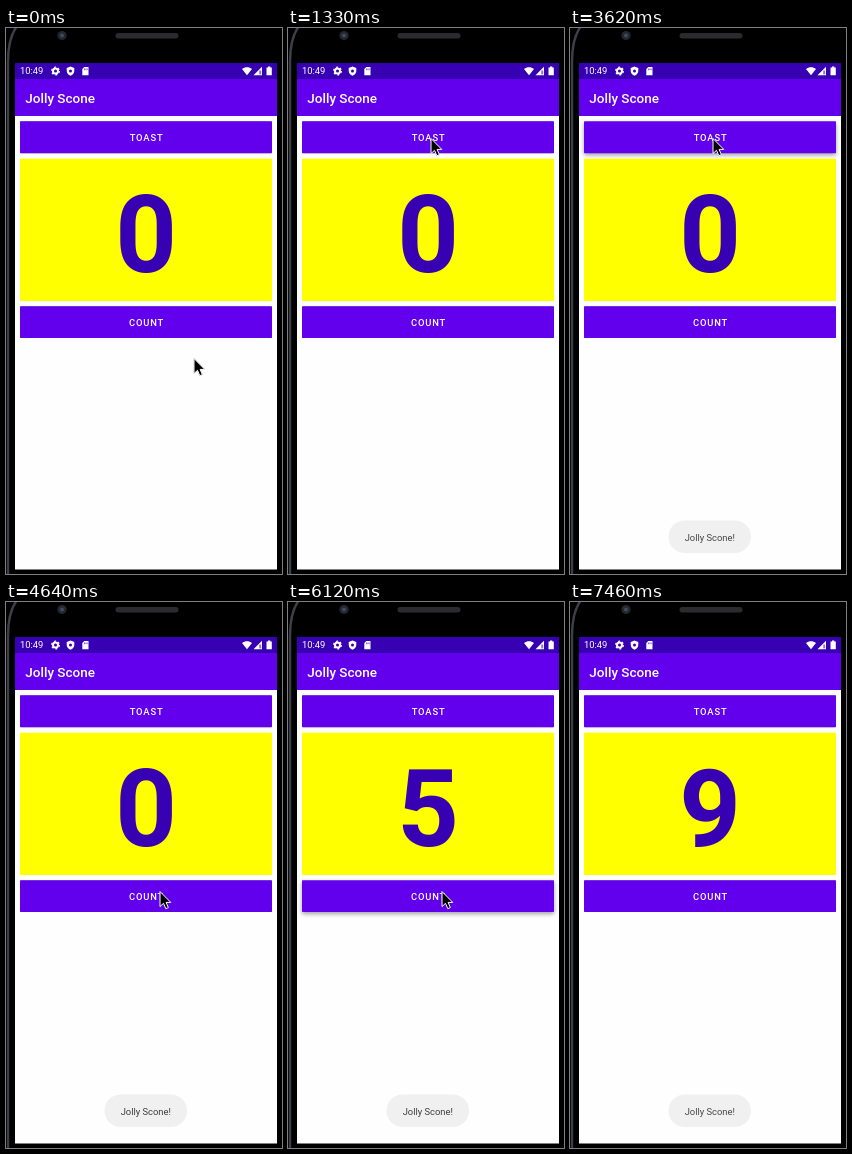
An HTML page for the animation above (7560 ms loop, 276 px wide and 546 px high).

```html
<!DOCTYPE html>
<html lang="en">
<head>
<meta charset="utf-8">
<title>Counter demo</title>
<style>
  html, body { margin: 0; width: 100%; height: 100%; overflow: hidden; background: #000; }
  svg { display: block; width: 100vw; height: 100vh; }
  text { font-family: Roboto, "Open Sans", sans-serif; fill: #fff; }
  .label { font-size: 9.4px; font-weight: 500; letter-spacing: .84px; text-anchor: middle; }
  .button { filter: drop-shadow(0 .7px .7px rgba(0, 0, 0, .35)); }
  .button.pressed { filter: drop-shadow(0 2px 2px rgba(0, 0, 0, .36)); }
</style>
</head>
<body>
<svg viewBox="0 0 276 546" xmlns="http://www.w3.org/2000/svg">
  <!-- phone -->
  <rect width="276" height="546" fill="#000"/>
  <path d="M11 -2C5 6 2 16 2 34V548" fill="none" stroke="#3d4049" stroke-width="2.4"/>
  <circle cx="56" cy="7.5" r="4.6" fill="#24272d"/>
  <circle cx="56" cy="7.5" r="2" fill="#3e4a60"/>
  <rect x="109.500" y="5" width="63" height="5.500" rx="2.750" fill="#2b2b2d"/>

  <!-- screen -->
  <rect x="9" y="35" width="262" height="506.500" fill="#fefefe"/>
  <rect x="9" y="51" width="262" height="37" fill="#6200ee"/>
  <rect x="9" y="35" width="262" height="16" fill="#3700b3"/>
  <text x="14" y="46.400" font-size="9.4">10:49</text>
  <g fill="#fff">
    <circle cx="49.500" cy="43" r="2.500" fill="none" stroke="#fff" stroke-width="2"/>
    <circle cx="49.500" cy="43" r="3.800" fill="none" stroke="#fff" stroke-width="1.300" stroke-dasharray="2 1.979"/>
    <path d="M64.500 38.500L68.300 40V43C68.300 45.300 66.500 47 64.500 47.700C62.500 47 60.700 45.300 60.700 43V40Z"/>
    <circle cx="64.500" cy="43" r="1.500" fill="#3700b3"/>
    <path d="M78.300 39H82.500V47.200H76.300V41Z"/>
    <path d="M78.500 40.500V42.200M79.900 40.500V42.200M81.200 40.500V42.200" stroke="#3700b3" stroke-width=".6"/>
    <path d="M236 41C239 38.500 243 38.500 246 41L241 47.200Z"/>
    <path d="M247.500 47.200L256 38.700V47.200Z"/>
    <path d="M253.200 42.500H255.200V46.400H253.200Z" fill="#3700b3" opacity=".55"/>
    <path d="M260.500 39.600H262V38.600H264.300V39.600H265.800V47.300H260.500Z"/>
  </g>
  <text x="19.300" y="74.700" font-size="13.5" font-weight="500">Jolly Scone</text>

  <rect class="button" id="top" x="14" y="93.300" width="252" height="32" rx=".8" fill="#6200ee"/>
  <text class="label" x="140.600" y="113">TOAST</text>
  <rect x="14" y="130.700" width="252" height="142.300" fill="#ff0"/>
  <text id="count" x="140" y="244.300" font-size="107.5" font-weight="700" text-anchor="middle" style="fill:#3700b3">0</text>
  <rect class="button" id="low" x="14" y="278.300" width="252" height="31.700" rx=".8" fill="#6200ee"/>
  <text class="label" x="140.600" y="298">COUNT</text>

  <g id="toast">
    <rect x="98.500" y="492.500" width="82.500" height="32.500" rx="16" fill="#f0f0f0"/>
    <text x="139.800" y="513" font-size="9.4" text-anchor="middle" style="fill:#3c3c3c">Jolly Scone!</text>
  </g>

  <g id="cursor">
    <path d="M0 .5V15.600L3.500 12.300L5.800 17.700L8.400 16.600L6.100 11.400H10.800Z"
      fill="#000" stroke="#fff" stroke-width="1" stroke-linejoin="round"
      style="filter:drop-shadow(0 .8px .7px rgba(0,0,0,.35))"/>
  </g>
</svg>
<script>
const LOOP = 7560;
const $ = id => document.getElementById(id);

// Each move: start, end, number of steps, target x and y.
const moves = [
  [150, 440, 3, 164, 227],
  [740, 1330, 5, 143, 110],
  [3760, 4200, 4, 147, 241],
  [4350, 4640, 3, 154, 289],
  [6860, 7160, 3, 166, 570]
];
const counts = [[0, 0], [5380, 1], [5670, 2], [5820, 3], [6120, 5], [6270, 6], [6410, 8], [6560, 9]];

// Share of a stepped change that is done at time t.
function stepped(t, from, to, n) {
  if (t < from) return 0;
  if (t >= to) return 1;
  return (1 + Math.floor((t - from) / (to - from) * (n - 1))) / n;
}

const ease = p => p * p * (3 - 2 * p);
const between = (t, a, b) => t >= a && t < b;

function cursorAt(t) {
  let x = 188, y = 330;
  for (const [from, to, n, tx, ty] of moves) {
    const p = ease(stepped(t, from, to, n));
    x += (tx - x) * p;
    y += (ty - y) * p;
  }
  return [x, y];
}

function toastAlpha(t) {
  const shown = stepped(t, 3180, 3760, 5);
  const fading = stepped(t, 7310, 7460, 2);
  return Math.sin(shown * Math.PI / 2) - .06 * fading;
}

function draw(t) {
  const [x, y] = cursorAt(t);
  $("cursor").setAttribute("transform", `translate(${x} ${y})`);
  $("toast").setAttribute("opacity", toastAlpha(t));
  $("count").textContent = counts.filter(c => c[0] <= t).pop()[1];
  $("top").classList.toggle("pressed", between(t, 2890, 3760));
  $("low").classList.toggle("pressed", between(t, 5080, 6710));
}

const start = performance.now();
function tick() {
  draw((performance.now() - start) % LOOP);
  requestAnimationFrame(tick);
}
tick();
</script>
</body>
</html>
```
